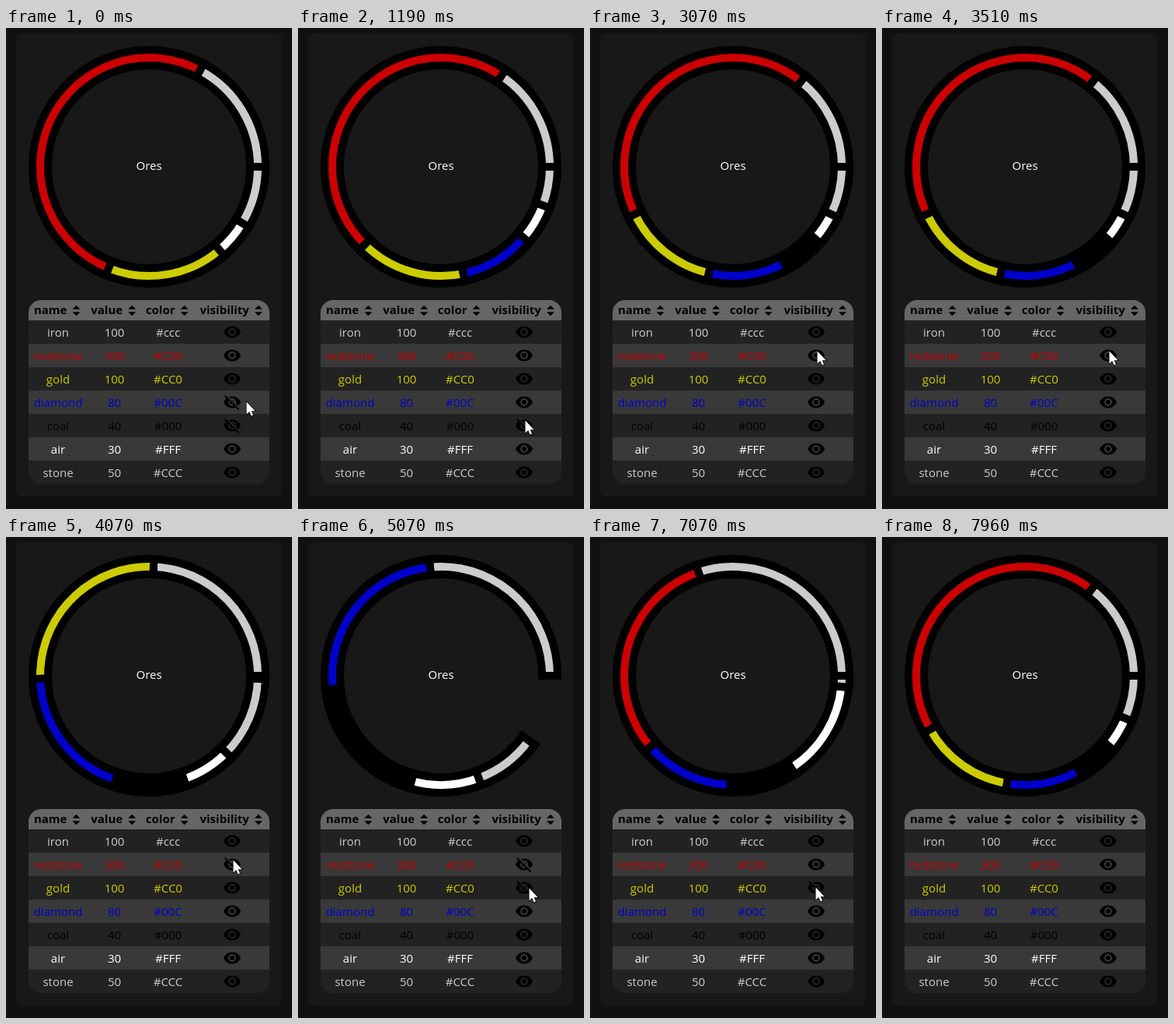
These frames come from a looping animation (368 by 617 pixels, 8.06 s). An HTML page with a canvas:

```html
<!DOCTYPE html>
<html lang="en">
<head>
<meta charset="utf-8">
<title>Ores</title>
<style>
  html, body { margin: 0; width: 100%; height: 100%; overflow: hidden; background: #111; }
  canvas { display: block; }
</style>
</head>
<body>
<canvas id="stage" width="368" height="617"></canvas>
<script>
const ctx = document.getElementById('stage').getContext('2d');
const LOOP = 8060, TWEEN = 500, MS_PER_PIXEL = 2;
const TABLE = { x: 29, y: 349, w: 310, head: 26, row: 30 };
const COLUMNS = { name: 67, value: 139.5, color: 208.5, visibility: 291 };
const ORES = [
  { name: 'iron', value: 100, color: '#ccc' },
  { name: 'redstone', value: 300, color: '#C00' },
  { name: 'gold', value: 100, color: '#CC0' },
  { name: 'diamond', value: 80, color: '#00C' },
  { name: 'coal', value: 40, color: '#000' },
  { name: 'air', value: 30, color: '#FFF' },
  { name: 'stone', value: 50, color: '#CCC' }
];
const HIDDEN_AT_START = ['diamond', 'coal'];
const ENTRY = { x: 309, y: 479 }, EXIT = { x: 290, y: 622 };
// Each click toggles the row under the pointer, which then rests before moving on.
const CLICKS = [
  { at: 812, x: 290, y: 481, rest: 40 },
  { at: 2130, x: 292, y: 503, rest: 300 },
  { at: 3602, x: 292, y: 414, rest: 550 },
  { at: 4975, x: 297, y: 450, rest: 1150 },
  { at: 6975, x: 291, y: 418, rest: 0 },
  { at: 7515, x: 290, y: 449, rest: 0 }
];
const EYE = new Path2D('M1 12C2.7 7.6 7 4.5 12 4.5S21.3 7.6 23 12C21.3 16.4 17 19.5 12 19.5S2.7 16.4 1 12Z');
const ARROW = new Path2D('M.5 .5V16.5L4.2 13L6.6 18.6L9 17.6L6.7 12.2H11.6Z');

const mix = (a, b, p) => a + (b - a) * p;
const clamp = v => Math.min(1, Math.max(0, v));
const rowTop = i => TABLE.y + TABLE.head + i * TABLE.row;
const rowAt = y => Math.floor((y - rowTop(0)) / TABLE.row);

function slices(visible) {
  const shown = ORES.filter((_, i) => visible[i]);
  const total = shown.reduce((sum, ore) => sum + ore.value, 0);
  return shown.map(({ color, value }) => ({ color, size: value / total * 2 * Math.PI }));
}

function stateAt(t) {
  const visible = ORES.map(ore => !HIDDEN_AT_START.includes(ore.name));
  let before = slices(visible), progress = 1;
  for (const { at, y } of CLICKS.filter(click => click.at <= t)) {
    const row = rowAt(y);
    before = slices(visible);
    visible[row] = !visible[row];
    progress = clamp((t - at) / TWEEN);
  }
  // Sizes are tweened by position in the list; an added last slice grows from zero.
  const ring = slices(visible).map(({ color, size }, i) => ({
    color,
    size: mix(before[i]?.size ?? 0, size, progress)
  }));
  return { visible, ring };
}

function pointerAt(t) {
  let from = ENTRY, leave = 0, to = CLICKS[0];
  CLICKS.forEach((click, i) => {
    if (click.at + click.rest > t) return;
    from = click;
    leave = click.at + click.rest;
    to = CLICKS[i + 1] || EXIT;
  });
  const distance = Math.hypot(to.x - from.x, to.y - from.y);
  const p = clamp((t - leave) / (distance * MS_PER_PIXEL));
  return { x: Math.round(mix(from.x, to.x, p)), y: Math.round(mix(from.y, to.y, p)) };
}

function box(x, y, w, h, r, color) {
  ctx.fillStyle = color;
  ctx.beginPath();
  ctx.roundRect(x, y, w, h, r);
  ctx.fill();
}

function setFont(weight) {
  ctx.font = `${weight} 15px "Open Sans", "Noto Sans", sans-serif`;
}

function text(str, x, y, color) {
  ctx.fillStyle = color;
  ctx.fillText(str, x, y);
}

function disc(x, y, r, color) {
  ctx.fillStyle = color;
  ctx.beginPath();
  ctx.arc(x, y, r, 0, 2 * Math.PI);
  ctx.fill();
}

function slash(x, y, color) {
  ctx.strokeStyle = color;
  ctx.beginPath();
  ctx.moveTo(x, y);
  ctx.lineTo(x + 17.8, y + 17.8);
  ctx.stroke();
}

function drawEye(x, y, open, back) {
  ctx.save();
  ctx.translate(x - 12, y - 12);
  ctx.fillStyle = '#000';
  ctx.fill(EYE);
  disc(12, 12, 5, back);
  disc(12, 12, 3, '#000');
  if (!open) {
    ctx.lineWidth = 1.9;
    slash(3.9, 2.3, back);
    slash(2.6, 3.6, '#000');
  }
  ctx.restore();
}

function drawRing(ring) {
  ctx.save();
  ctx.translate(184, 178);
  ctx.strokeStyle = '#000';
  ctx.lineWidth = 10;
  let angle = 0;
  for (const { color, size } of ring) {
    if (size < 0.001) continue;
    ctx.beginPath();
    ctx.arc(0, 0, 150, -angle, -angle - size, true);
    ctx.arc(0, 0, 130, -angle - size, -angle);
    ctx.closePath();
    ctx.fillStyle = color;
    ctx.fill();
    ctx.stroke();
    angle += size;
  }
  ctx.restore();
}

function drawSortIcon(x, y) {
  ctx.fillStyle = '#000';
  for (const dir of [-1, 1]) {
    const base = y + dir * 1.7;
    ctx.beginPath();
    ctx.moveTo(x - 5, base);
    ctx.lineTo(x + 5, base);
    ctx.lineTo(x, base + dir * 5);
    ctx.fill();
  }
}

function drawHeader() {
  box(TABLE.x, TABLE.y, TABLE.w, TABLE.head, 0, '#666');
  setFont(700);
  ctx.textAlign = 'left';
  for (const [label, center] of Object.entries(COLUMNS)) {
    const width = ctx.measureText(label).width;
    const left = center - 1.3 - (width + 17) / 2;
    text(label, left, TABLE.y + 18, '#000');
    drawSortIcon(left + width + 12, TABLE.y + 13.5);
  }
}

function drawRow(ore, i, open) {
  const top = rowTop(i), back = i % 2 ? '#393939' : '#222';
  box(TABLE.x, top, TABLE.w, TABLE.row, 0, back);
  for (const key of ['name', 'value', 'color']) {
    text(ore[key], COLUMNS[key], top + 21, ore.color);
  }
  drawEye(COLUMNS.visibility, top + 15, open, back);
}

function drawTable(visible) {
  ctx.save();
  ctx.beginPath();
  ctx.roundRect(TABLE.x, TABLE.y, TABLE.w, rowTop(ORES.length) - TABLE.y, 16);
  ctx.clip();
  drawHeader();
  setFont(400);
  ctx.textAlign = 'center';
  ORES.forEach((ore, i) => drawRow(ore, i, visible[i]));
  ctx.restore();
}

function drawPointer({ x, y }) {
  ctx.save();
  ctx.translate(x, y);
  ctx.strokeStyle = '#000';
  ctx.lineWidth = 1.5;
  ctx.stroke(ARROW);
  ctx.fillStyle = '#fff';
  ctx.fill(ARROW);
  ctx.restore();
}

function draw(t) {
  const { visible, ring } = stateAt(t);
  box(0, 0, 368, 617, 0, '#111');
  box(13, 7, 342, 594, 8, '#181818');
  drawRing(ring);
  setFont(400);
  ctx.textAlign = 'center';
  text('Ores', 184, 182, '#fff');
  drawTable(visible);
  drawPointer(pointerAt(t));
}

const begin = performance.now();
function tick() {
  draw((performance.now() - begin) % LOOP);
  requestAnimationFrame(tick);
}
tick();
</script>
</body>
</html>
```
